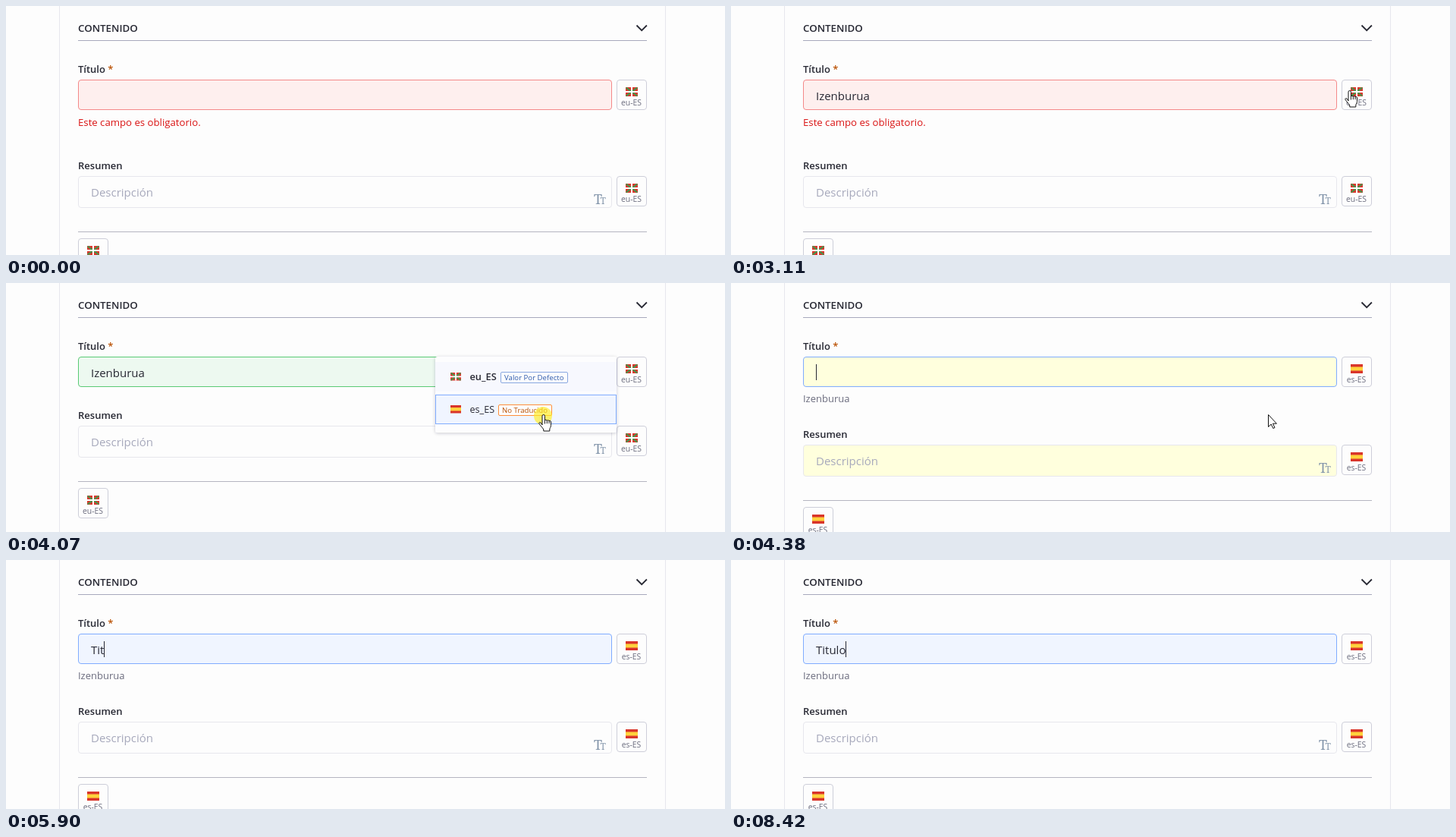
An HTML page for the animation above (8710 ms loop, 948x328 px).

```html
<!DOCTYPE html>
<html lang="es">
<head>
<meta charset="utf-8">
<title>Contenido</title>
<style>
  html, body { margin: 0; width: 100%; height: 100%; overflow: hidden; background: #fdfdfd; }
  svg { display: block; font-family: "Open Sans", "Noto Sans", sans-serif; font-size: 13px; fill: #272833; }
  .label { font-weight: 600; }
  .value { font-size: 15px; }
  .hint { font-size: 15px; fill: #a7a9bc; }
  .code { font-size: 10.4px; fill: #6b6c7e; text-anchor: middle; }
  .pill { font-size: 9.65px; }
  .box { fill: #fdfdfd; stroke: #cdced9; }
  .rule { stroke: #b4b5c0; }
  .icon { font-family: "Noto Serif", serif; fill: #8496ab; }
  .line { fill: none; stroke: #272833; }
  .pointer { fill: #fff; stroke: #111; stroke-linejoin: round; }
</style>
</head>
<body>
<svg width="948" height="328" viewBox="0 0 948 328">
  <defs>
    <g id="flag-eu">
      <path fill="#d8392f" d="M0 0h16v12H0z"/>
      <path stroke="#3f9a4d" stroke-width="2" d="M.7.5 15.3 11.5M15.3.5.7 11.5"/>
      <path stroke="#fff" stroke-width="2" d="M8 0v12M0 6h16"/>
    </g>
    <g id="flag-es">
      <path fill="#d9352b" d="M0 0h16v12H0z"/>
      <path fill="#ffd23c" d="M0 3.5h16v5H0z"/>
    </g>
    <g id="lang-eu">
      <rect class="box" x=".5" y=".5" width="39" height="39" rx="3.5"/>
      <use href="#flag-eu" x="12" y="10"/>
      <text class="code" x="19.5" y="34">eu-ES</text>
    </g>
    <g id="lang-es">
      <rect class="box" x=".5" y=".5" width="39" height="39" rx="3.5"/>
      <use href="#flag-es" x="12" y="10"/>
      <text class="code" x="19.5" y="34">es-ES</text>
    </g>
    <path id="arrow" class="pointer" d="M.5.5v16l3.7-3.5 2.6 5.5 2.2-1-2.6-5.3h5z"/>
    <g id="hand" class="pointer">
      <path d="M5 14V2.2a1.7 1.7 0 0 1 3.4 0V8.5q0-1.2 1.4-1.2t1.5 1.4q0-1 1.3-1t1.5 1.5q0-.8 1.1-.8t1.3 1.6V14.5c0 2.5-1.7 3.5-1.7 5.5V22H6.8V20C5.5 17.5 2.5 15 1 12.2c-.6-1.2 1-2.1 2-1.2z"/>
      <path fill="none" d="M8.4 8.5v4M11.3 8.7v3.5M14.1 9.2v3"/>
    </g>
    <path id="beam" class="line" d="M1 .5h2.5l1 1 1-1H8M4.5 1v14M1 15.5h2.5l1-1 1 1H8"/>
    <filter id="shadow" x="-10%" y="-10%" width="120%" height="125%">
      <feDropShadow dx="0" dy="1" stdDeviation="2" flood-color="#272833" flood-opacity=".22"/>
    </filter>
  </defs>

  <path stroke="#e7e7ed" d="M70.5 0v328M869.5 0v328"/>
  <text class="label" x="95" y="34" style="font-size:13.3px">CONTENIDO</text>
  <path class="line" stroke-width="1.8" d="m831.5 25.5 6.7 6.7 6.7-6.7"/>
  <path stroke="#a7a9bc" d="M95 45.5h750"/>

  <text class="label" x="95" y="88">Título <tspan fill="#b95000">*</tspan></text>
  <rect id="field" x="95.5" y="97.5" width="703" height="39" rx="3.5"/>
  <text id="value" class="value" x="112" y="124"></text>
  <rect id="caret" y="107" width="1" height="21"/>
  <use class="lang" x="805" y="97"/>
  <text id="error" x="95" y="158" style="font-size:13.2px" fill="#da1414">Este campo es obligatorio.</text>
  <text id="helper" x="95" y="157" fill="#6b6c7e">Izenburua</text>

  <g id="rest">
    <text class="label" x="95" y="215">Resumen</text>
    <rect id="summary" x="95.5" y="224.5" width="703" height="41" rx="3.5" stroke="#e7e7ed"/>
    <text class="hint" x="112" y="251">Descripción</text>
    <text class="icon" x="775" y="261" font-size="18">T</text>
    <text class="icon" x="783.5" y="261" font-size="12">T</text>
    <use class="lang" x="805" y="224"/>
    <path class="rule" d="M95 297.5h750"/>
    <use class="lang" x="95" y="306"/>
  </g>

  <g id="menu">
    <rect x="566" y="97" width="239" height="100" rx="3" fill="#fdfdfe" filter="url(#shadow)"/>
    <path fill="#f7f8fe" d="M566 104h239v39H566z"/>
    <use href="#flag-eu" transform="translate(586 118) scale(.875)"/>
    <text class="label" x="611.5" y="128" style="font-size:12.8px">eu_ES</text>
    <rect x="652.5" y="117.5" width="88" height="14" rx="1.5" fill="#fdfdfe" stroke="#89a7e0"/>
    <text class="pill" x="657" y="128" fill="#2e5aac">Valor Por Defecto</text>
    <rect x="566.5" y="147.5" width="238" height="38" fill="#f0f5ff" stroke="#80acff"/>
    <use href="#flag-es" transform="translate(586 161) scale(.875)"/>
    <text x="611.5" y="171" style="font-size:12.6px">es_ES</text>
    <rect x="649.5" y="160.5" width="70" height="14" rx="1.5" fill="#fdfdfe" stroke="#ff8f39"/>
    <text class="pill" x="654" y="171" fill="#b95000">No Traducido</text>
  </g>

  <circle id="click" r="12" fill="#ffec1f" opacity=".65"/>
  <use id="pointer"/>
</svg>
<script>
const LOOP = 8710;
const $ = id => document.getElementById(id);
const langs = document.querySelectorAll('.lang');

// Each step changes only the listed properties.
const steps = [
  [0, { text: '', caret: false, pointer: null, click: null, menu: false, error: true, helper: false,
        lang: 'eu', shift: 0, fill: '#feefee', edge: '#f48989', summary: '#fdfdfd' }],
  [290, { pointer: ['arrow', 426, 157] }],
  [600, { pointer: ['arrow', 357, 134] }],
  [920, { pointer: null, text: 'Iz', caret: true }],
  [1250, { text: 'Izen' }],
  [1570, { text: 'Izenb' }],
  [1870, { text: 'Izenbur' }],
  [2190, { text: 'Izenburua' }],
  [2810, { caret: false, pointer: ['arrow', 783, 161] }],
  [3110, { pointer: ['hand', 809, 111] }],
  [3430, { click: [815, 113], error: false, shift: -36, fill: '#edf9f0', edge: '#5aca75' }],
  [3750, { click: null, menu: true, pointer: ['hand', 820, 123] }],
  [4070, { click: [708, 175], pointer: ['hand', 702, 173] }],
  [4380, { click: null, menu: false, pointer: ['arrow', 708, 173], lang: 'es', shift: -11, helper: true,
           text: '', caret: true, fill: '#ffffdd', edge: '#80acff', summary: '#ffffdd' }],
  [4670, { pointer: ['arrow', 338, 142], fill: '#fffffb', summary: '#fffffb' }],
  [4990, { pointer: null, caret: false, fill: '#f0f5ff', summary: '#fdfdfd' }],
  [5600, { text: 'T', caret: true }],
  [5900, { text: 'Tit' }],
  [6220, { text: 'Titul' }],
  [7170, { text: 'Titulo', pointer: ['beam', 324, 108] }],
  [7470, { pointer: null }],
  [7790, { caret: false }],
  [8420, { caret: true }]
];

const set = (el, attrs) => {
  for (const name in attrs) el.setAttribute(name, attrs[name]);
};
const show = (id, on) => { $(id).style.display = on ? '' : 'none'; };

function draw(s) {
  for (const id of ['caret', 'error', 'helper', 'menu', 'click', 'pointer']) show(id, s[id]);
  set($('field'), { fill: s.fill, stroke: s.edge });
  set($('summary'), { fill: s.summary });
  set($('rest'), { transform: `translate(0 ${s.shift})` });
  langs.forEach(el => set(el, { href: '#lang-' + s.lang }));
  $('value').textContent = s.text;
  const width = s.text ? $('value').getComputedTextLength() : 0;
  set($('caret'), { x: Math.round(112 + width) });
  if (s.click) set($('click'), { cx: s.click[0], cy: s.click[1] });
  if (s.pointer) {
    const [shape, x, y] = s.pointer;
    set($('pointer'), { href: '#' + shape, x, y });
  }
}

let last = -1;
function tick() {
  const t = performance.now() % LOOP;
  const count = steps.filter(([start]) => start <= t).length;
  if (count !== last) {
    last = count;
    draw(Object.assign({}, ...steps.slice(0, count).map(step => step[1])));
  }
  requestAnimationFrame(tick);
}
tick();
</script>
</body>
</html>
```
